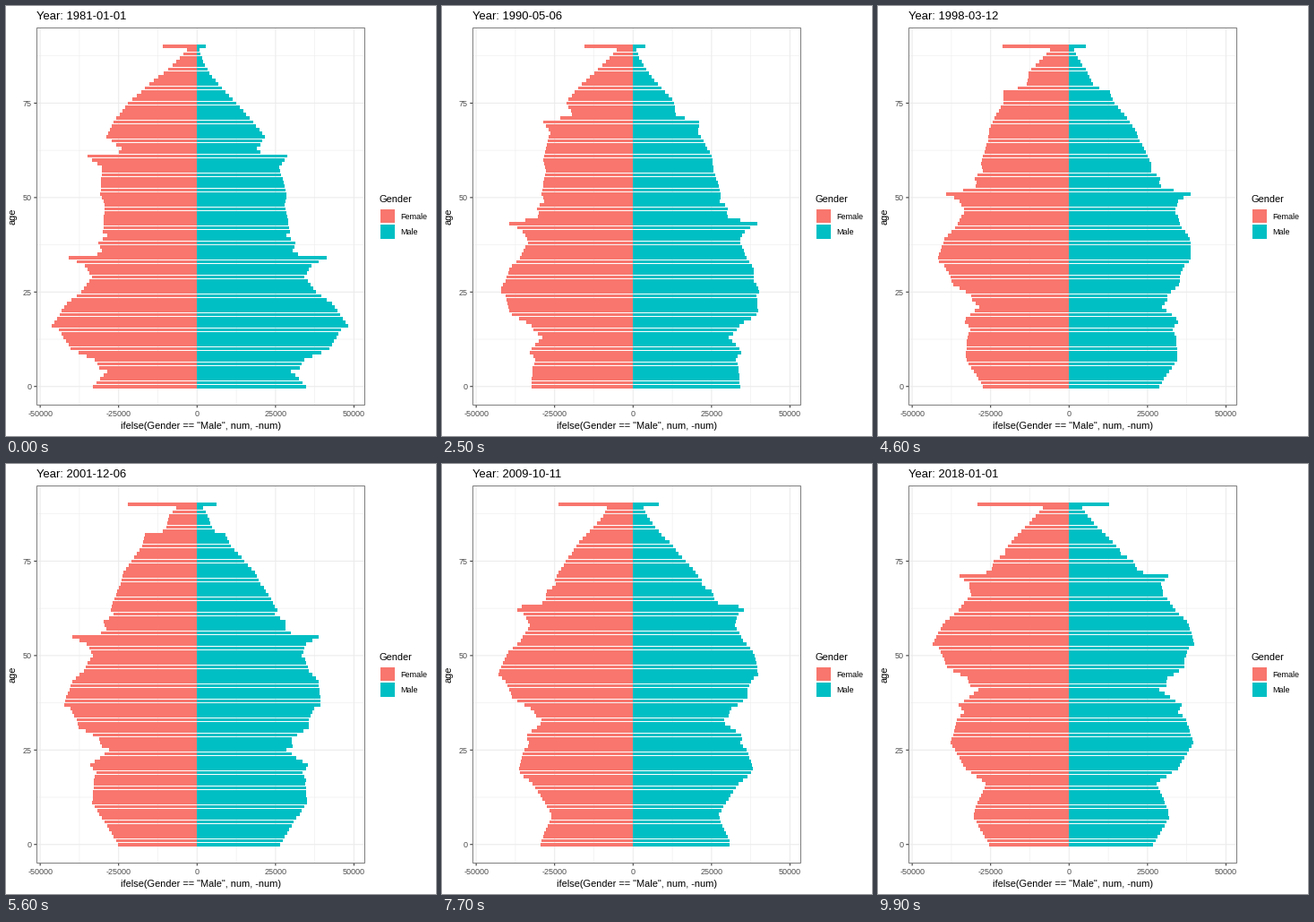
Write a matplotlib script that moves like this. It is 480 px wide and 480 px high and loops after 10000 ms.

```python
import numpy as np
import matplotlib.pyplot as plt
from matplotlib.animation import FuncAnimation
from matplotlib.collections import PolyCollection
from matplotlib.patches import Rectangle

plt.rcParams["font.family"] = "Liberation Sans"

SIZE, FRAMES = 480, 100
FIRST, LAST, DAYS = 1981, 2018, 13514
LEFT, RIGHT, TOP, BOTTOM = 34.3, 400.3, 24.1, 445.4
X0, X_UNIT = 213.3, 3.503
Y0, Y_UNIT = 424.72, 4.2174
GREY20, GREY30, GREY50, GREY92 = "#333333", "#4D4D4D", "#7F7F7F", "#EBEBEB"

# Turning points of the cohort curve: birth year, thousands of women
# in the first year shown or at birth.
COHORTS = [
    (1892, 3.2), (1896, 7.8), (1901, 15.2), (1906, 22), (1911, 26.6),
    (1915, 28.9), (1918, 24.1), (1919, 24.9), (1920, 34.9), (1923, 30.3),
    (1930, 30.8), (1933, 29.4), (1940, 30), (1941, 28.6), (1943, 31.5),
    (1945, 30.3), (1946, 31.8), (1947, 40.9), (1949, 35.8), (1952, 33.5),
    (1956, 36.9), (1959, 41.5), (1965, 46.3), (1966, 44), (1971, 40.3),
    (1974, 32.6), (1976, 31.2), (1977, 28.6), (1981, 33.2), (1983, 30.9),
    (1985, 32), (1991, 32.5), (1996, 28.8), (2002, 25.2), (2009, 29.3),
    (2011, 29.6), (2018, 25.5)]
OLDEST_YEARS = [1981, 1986, 1998, 2009, 2018]


def ramp(x, start, end):
    return np.clip((x - start) / (end - start), 0, 1)


def to_x(thousands):
    return X0 + thousands * X_UNIT


def to_y(age):
    return Y0 - age * Y_UNIT


class Sex:
    def __init__(self, sign, color, hazard, growth, leaving, oldest):
        self.sign, self.color = sign, color
        self.hazard, self.growth, self.leaving = hazard, growth, leaving
        self.oldest = oldest
        self.years = np.array([self.pyramid(y) for y in range(FIRST, LAST + 1)])

    def pyramid(self, year):
        """Thousands of people by age, the last entry being 90 and over."""
        age = np.arange(90)
        born = year - age
        since = np.maximum(born, FIRST)
        start_age = since - born
        cohort = FIRST - born

        size = np.interp(born, *zip(*COHORTS))
        if self.sign > 0:
            size = size * 1.055 * np.exp(-0.0047 * np.exp(0.065 * start_age))

        # Mortality rises exponentially with age.
        risk = self.hazard * np.exp(0.095 * (cohort - 61))
        k = self.growth
        deaths = risk * (np.exp(k * (year - FIRST)) - np.exp(k * (since - FIRST)))

        # Young adults leave early on, later years bring people in.
        left = self.leaving * ramp(cohort, -4, 12)
        left = left * (ramp(age, 16, 28) - ramp(start_age, 16, 28))
        came = 0.08 * (ramp(year, 1994, LAST) - ramp(since, 1994, LAST))
        came = came * ramp(-cohort, -53, -47)
        students = 0.13 * ramp(born, 1979, 1999) * ramp(age, 16.5, 20)

        size = size * np.exp(-deaths) * (1 - left + came) * (1 + students)
        return np.append(size, np.interp(year, OLDEST_YEARS, self.oldest))

    def bars(self, i):
        verts = []
        for age, col in enumerate(self.years.T):
            x = round(to_x(self.sign * np.interp(i, KEYS, col)))
            lo, hi = round(to_y(age - 0.45)), round(to_y(age + 0.45))
            x0 = round(X0)
            verts.append([(x0, lo), (x, lo), (x, hi), (x0, hi)])
        return verts


# Frame at which each whole year is reached.
KEYS = np.round((FRAMES - 1) * np.arange(LAST - FIRST + 1) / (LAST - FIRST))

female = Sex(-1, "#F8766D", 0.169, 0.08, 0.1, [10.9, 12.5, 21.2, 23.5, 29.2])
male = Sex(1, "#00BFC4", 0.313, 0.074, 0.2, [2.8, 3.0, 5.3, 7.7, 12.8])

fig = plt.figure(figsize=(SIZE / 72, SIZE / 72), dpi=72, facecolor="white")
ax = fig.add_axes([0, 0, 1, 1])
ax.set_xlim(0, SIZE)
ax.set_ylim(SIZE, 0)
ax.axis("off")


def line(xs, ys, color, width=1.07):
    ax.plot(xs, ys, color=color, lw=width, zorder=1, snap=False,
            solid_capstyle="butt")


def label(x, y, text, size, color="black", **kw):
    return ax.text(x, y, text, fontsize=size, color=color, **kw)


for v in np.arange(-37.5, 50, 25):
    line([to_x(v)] * 2, [TOP, BOTTOM], GREY92, 0.53)
for a in np.arange(12.5, 100, 25):
    line([LEFT, RIGHT], [to_y(a)] * 2, GREY92, 0.53)
for v in range(-50, 51, 25):
    x = to_x(v)
    line([x, x], [TOP, BOTTOM], GREY92)
    line([x, x], [BOTTOM, BOTTOM + 3], GREY20)
    label(x, 458, str(v * 1000), 9, GREY30, ha="center")
for a in range(0, 76, 25):
    y = to_y(a)
    line([LEFT, RIGHT], [y, y], GREY92)
    line([LEFT - 3, LEFT], [y, y], GREY20)
    label(29, y + 3.3, str(a), 9, GREY30, ha="right")

layers = []
for sex in (female, male):
    bars = PolyCollection(sex.bars(0), facecolors=sex.color, edgecolors="none",
                          linewidths=0, zorder=2)
    bars.set_snap(False)
    ax.add_collection(bars, autolim=False)
    layers.append((sex, bars))

ax.add_patch(Rectangle((LEFT, TOP), RIGHT - LEFT, BOTTOM - TOP, fill=False,
                       ec=GREY50, lw=1, zorder=3))

title = label(34, 15, "", 13)
label(217.5, 472, 'ifelse(Gender == "Male", num, -num)', 11, ha="center")
label(13, 234.5, "age", 11, rotation=90, ha="right", va="center")
label(416.5, 219, "Gender", 11)
for top, bottom, name, sex in ((227, 242, "Female", female), (244, 260, "Male", male)):
    ax.add_patch(Rectangle((418, top), 16, bottom - top, fc=sex.color, ec="none", lw=0))
    label(440, top + 11, name, 9)


def update(i):
    day = np.datetime64(f"{FIRST}-01-01") + np.timedelta64(i * DAYS // (FRAMES - 1), "D")
    title.set_text(f"Year: {day}")
    for sex, bars in layers:
        bars.set_verts(sex.bars(i))
    return [title] + [bars for _, bars in layers]


anim = FuncAnimation(fig, update, frames=FRAMES, interval=100, repeat=True,
                     repeat_delay=0, blit=False)
plt.show()
```
